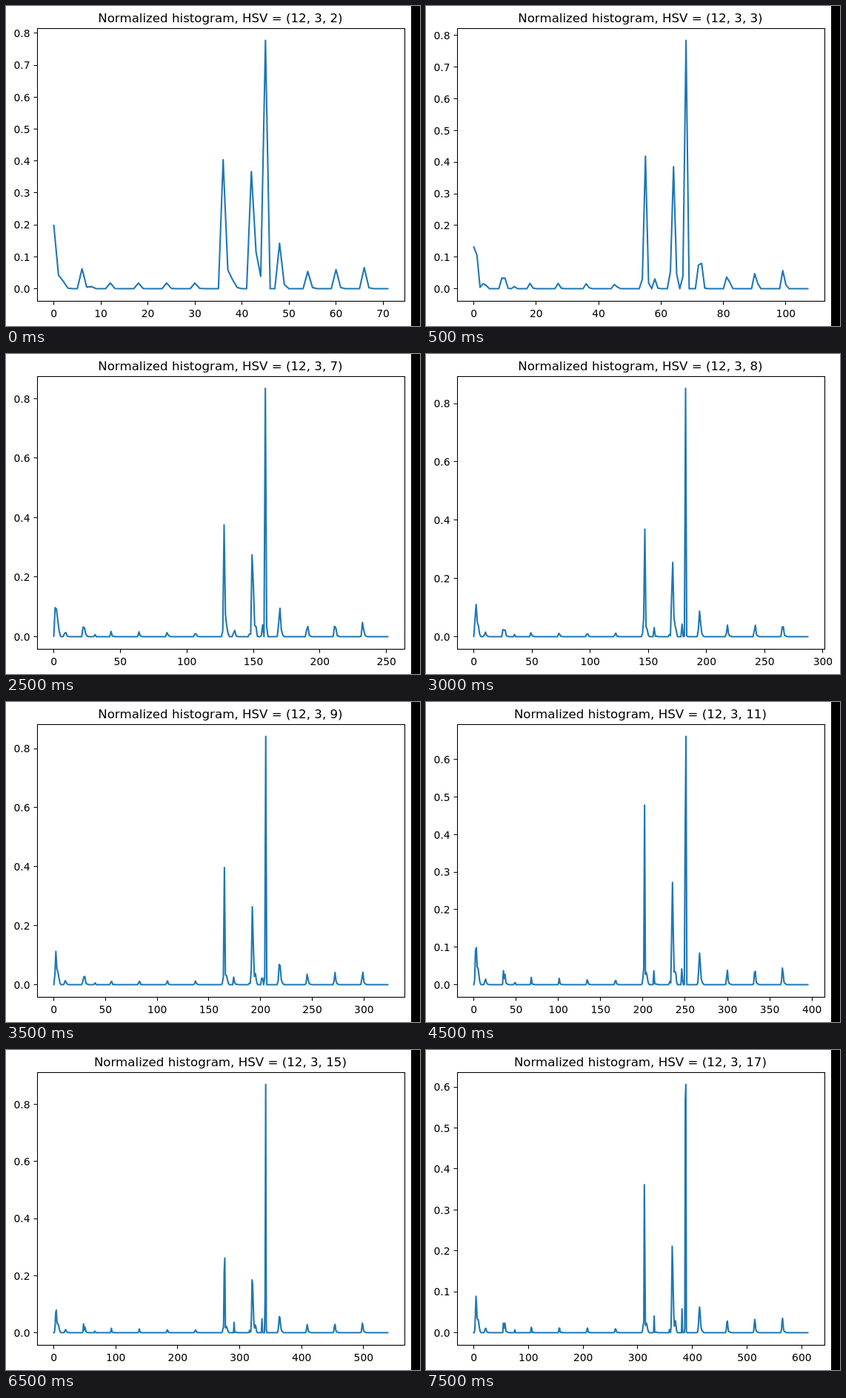
An HTML page that plays this animation: 559 px wide and 433 px high, repeating every 8000 ms.

```html
<!DOCTYPE html>
<html lang="en">
<head>
<meta charset="utf-8">
<title>Normalized histogram</title>
<style>
  html, body { margin: 0; width: 100%; height: 100%; overflow: hidden; background: #fff; }
  svg { display: block; font: 13.89px "DejaVu Sans", sans-serif; }
  #title { font-size: 16.67px; text-anchor: middle; }
  #xLabels { text-anchor: middle; }
  #yLabels { text-anchor: end; }
  #frame, #ticks { fill: none; stroke: #000; stroke-width: 1.1; }
  #curve { fill: none; stroke: #1f77b4; stroke-width: 2.08; stroke-linejoin: round; stroke-linecap: square; }
</style>
</head>
<body>
<svg width="559" height="433" viewBox="0 0 559 433">
  <rect width="559" height="433" fill="#fff"/>
  <path id="curve"/>
  <path id="ticks"/>
  <rect id="frame" x="42.5" y="30.5" width="496" height="369"/>
  <text id="title" x="289.4" y="22"></text>
  <g id="xLabels"></g>
  <g id="yLabels"></g>
  <rect id="stripe" y="0" height="433" fill="#000"/>
</svg>
<script>
const HUES = 12, SATS = 3, FIRST = 2, STEPS = 16, STEP_MS = 500;
const X0 = 64.55, X_SPAN = 450.9, Y0 = 382.5, Y_SPAN = 336;

const $ = id => document.getElementById(id);
const snap = v => Math.floor(v) + .5;

// Normal cumulative distribution, tanh approximation
const phi = z => .5 * (1 + Math.tanh(.7979 * (z + .044715 * z ** 3)));

function histogram(bins) {
  const values = new Array(HUES * SATS * bins).fill(0);

  // Spread a bell curve of brightness over the bins of one hue and saturation
  const bell = (hue, sat, mass, mean, dev) => {
    const base = (hue * SATS + sat) * bins;
    const below = i => phi((i / bins - mean) / dev);
    for (let i = 0; i < bins; i++) values[base + i] += mass * (below(i + 1) - below(i));
  };
  // The same with a faint tail towards bright values
  const skewed = (hue, sat, mass, mean, dev) => {
    bell(hue, sat, mass, mean, dev);
    bell(hue, sat, mass * .15, mean + .2, .11);
  };

  // Reds
  skewed(0, 0, 165, .27, .057);
  bell(0, 0, 95, .48, .11);
  skewed(0, 1, 26, .3, .07);

  // Yellows to greens: small, ever wider bumps
  skewed(1, 0, 34, .233, .025);
  skewed(1, 0, 35, .385, .045);
  bell(1, 1, 8, .46, .02);
  for (let k = 0; k < 4; k++) skewed(k + 2, 0, 19, .23 + .006 * k * k, .03 + .009 * k);

  // Cyans
  bell(6, 0, 45, .29, .06);
  skewed(6, 0, 415, .403, .021);
  bell(6, 0, 25, .56, .1);
  skewed(6, 1, 33, .433, .013);

  // Blues, with the bright main peak
  bell(7, 0, 10, .11, .025);
  bell(7, 0, 355, .385, .05);
  bell(7, 0, 135, .495, .05);
  bell(7, 0, 70, .72, .07);
  bell(7, 1, 46, .445, .012);
  bell(7, 1, 35, .775, .015);
  bell(7, 1, 885, .825, .0185);

  // Violets to pinks: medium bumps that get darker
  skewed(8, 0, 160, .325, .077);
  for (let k = 0; k < 3; k++) skewed(k + 9, 0, 59 + 6 * k, .3 - .025 * k, .058);

  const norm = Math.hypot(...values);
  return values.map(v => v / norm);
}

// Round tick positions from 0 to the upper margin, at most nine intervals
function tickValues(max) {
  const raw = max * 1.1 / 9;
  const unit = 10 ** Math.floor(Math.log10(raw));
  const step = unit * [1, 2, 2.5, 5, 10].find(s => s * unit >= raw);
  const count = Math.floor(max * 1.05 / step) + 1;
  return Array.from({ length: count }, (_, i) => i * step);
}

const label = (x, y, text) => `<text x="${x.toFixed(2)}" y="${y}">${text}</text>`;

function draw(bins) {
  const values = histogram(bins);
  const last = values.length - 1;
  const peak = Math.max(...values);
  const px = i => X0 + X_SPAN * i / last;
  const py = v => Y0 - Y_SPAN * v / peak;
  const xs = tickValues(last), ys = tickValues(peak);

  $('title').textContent = `Normalized histogram, HSV = (${HUES}, ${SATS}, ${bins})`;
  $('curve').setAttribute('d', 'M' + values.map((v, i) => px(i).toFixed(2) + ' ' + py(v).toFixed(2)).join('L'));
  $('ticks').setAttribute('d',
    xs.map(v => `M${snap(px(v))} 399.5v5`).join('') +
    ys.map(v => `M42.5 ${snap(py(v))}h-5`).join(''));
  $('xLabels').innerHTML = xs.map(v => label(px(v), 421, Math.round(v))).join('');
  $('yLabels').innerHTML = ys.map(v => label(32.6, Math.round(py(v) + 5.3), v.toFixed(1))).join('');

  // The picture widens when the last tick label overhangs the axes
  const edge = Math.max(547, Math.round(px(xs[xs.length - 1]) + 23.2));
  $('stripe').setAttribute('x', edge);
  $('stripe').setAttribute('width', Math.max(0, 559 - edge));
}

let shown = 0;
const start = performance.now();
function tick(now) {
  const bins = FIRST + Math.floor(Math.max(0, now - start) / STEP_MS) % STEPS;
  if (bins !== shown) draw(shown = bins);
  requestAnimationFrame(tick);
}
tick(start);
</script>
</body>
</html>
```
